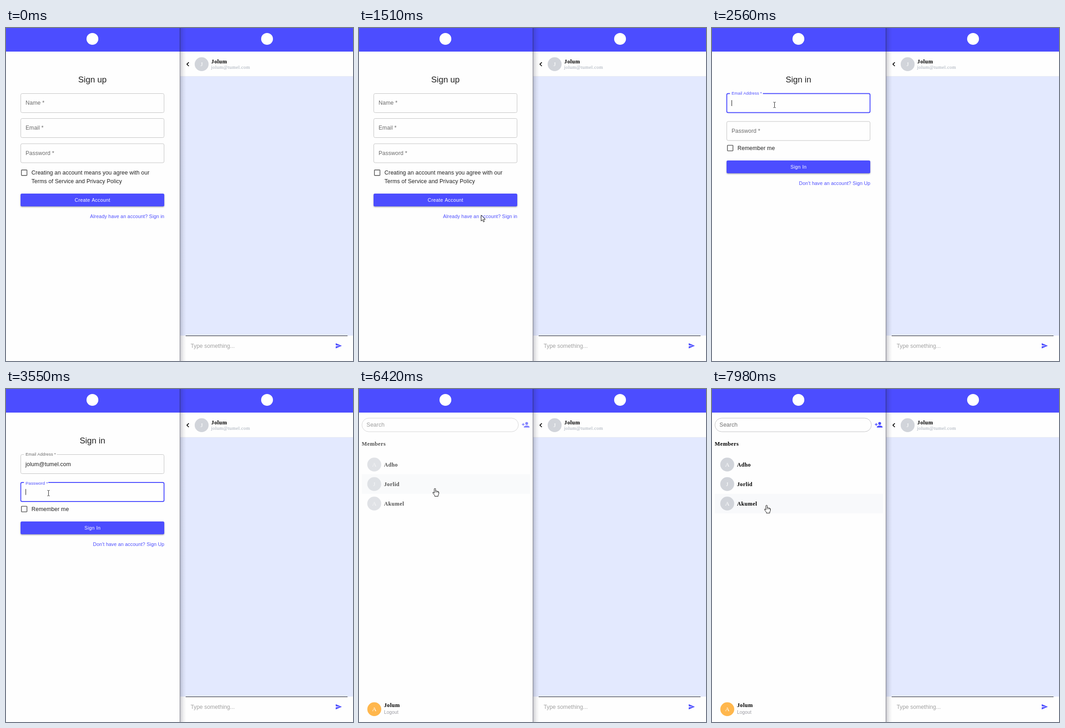
An HTML page with a canvas that plays this animation: 763 px wide and 734 px high, repeating every 8000 ms.

```html
<!DOCTYPE html>
<html lang="en">
<head>
<meta charset="utf-8">
<title>Chat sign-in</title>
<style>
html, body { margin: 0; width: 100%; height: 100%; overflow: hidden; background: #fefefe; }
canvas { display: block; width: 763px; height: 734px; }
</style>
</head>
<body>
<canvas id="stage" width="763" height="734"></canvas>
<script>
const ctx = document.getElementById('stage').getContext('2d');
const LOOP = 8000;
const SANS = '"Liberation Sans", Arial, sans-serif';
const SERIF = '"Liberation Serif", "Times New Roman", serif';
const BLUE = '#4c4dff', WHITE = '#fefefe', INK = '#212121', MUTED = '#6a6a6a', GREY = '#d1d4da';
const BODY = 12.27, SMALL = 10.72;
const USER = 'Jolum', EMAIL = 'jolum@tumel.com';
const MEMBERS = ['Adho', 'Jorlid', 'Akumel'];

const SIGN_IN_AT = 1560, FILLED_AT = 2910, PASSWORD_AT = 3440, RESET_AT = 5760, HOME_AT = 6100;
const KEYS = [4090, 4200, 4310, 4540, 4620, 4700];

// Pointer path: time, x, y
const PATH = [
  [120, 716, 700], [190, 660, 645], [260, 604, 598], [330, 562, 549], [400, 481, 526],
  [470, 428, 507], [720, 262, 468], [900, 240, 468], [950, 240, 468], [1250, 268, 412],
  [1600, 268, 412], [2180, 137, 169], [2950, 137, 169], [3430, 93, 229], [3550, 93, 229],
  [3670, 97, 231], [5180, 97, 231], [5270, 167, 219], [6920, 167, 219], [6990, 161, 219],
  [7190, 161, 219], [7680, 116, 266], [7850, 116, 266], [7980, 120, 256]
];

const clamp = v => Math.max(0, Math.min(1, v));
const mix = (a, b, k) => a + (b - a) * k;

// cubic-bezier(0, 0, .2, 1)
function settle(x) {
  let lo = 0, hi = 1;
  for (let i = 0; i < 16; i++) {
    const s = (lo + hi) / 2;
    if (.6 * s * s + .4 * s ** 3 < x) lo = s; else hi = s;
  }
  return lo * lo * (3 - 2 * lo);
}
const ramp = (t, start) => settle(clamp((t - start) / 200));

function text(str, x, y, { size = BODY, color = INK, family = SANS, weight = 'normal', align = 'left', spacing = 0 } = {}) {
  ctx.font = `${weight} ${size}px ${family}`;
  ctx.letterSpacing = spacing + 'px';
  ctx.textAlign = align;
  ctx.fillStyle = color;
  ctx.fillText(str, x, y);
  return ctx.measureText(str).width;
}
const name = (str, x, y) => text(str, x, y, { family: SERIF, weight: 'bold', color: '#000', spacing: .45 });

function rect(x, y, w, h, color) {
  ctx.fillStyle = color;
  ctx.fillRect(x, y, w, h);
}

function rounded(x, y, w, h, r) {
  ctx.beginPath();
  ctx.roundRect(x, y, w, h, r);
}

function outline(color, width) {
  ctx.strokeStyle = color;
  ctx.lineWidth = width;
  ctx.stroke();
}

function disc(x, y, r, color) {
  ctx.fillStyle = color;
  ctx.beginPath();
  ctx.arc(x, y, r, 0, 7);
  ctx.fill();
}

function polygon(x, y, pts) {
  ctx.beginPath();
  for (let i = 0; i < pts.length; i += 2) ctx.lineTo(x + pts[i], y + pts[i + 1]);
  ctx.closePath();
}

function avatar(letter, x, y, color = GREY) {
  disc(x, y, 15.3, color);
  text(letter, x, y + 4.4, { size: 13.5, family: SERIF, color: '#fff', align: 'center' });
}

function field(y, label, { value = '', focus = false, lift = 0, caret = false } = {}) {
  const size = mix(BODY, BODY * .75, lift);
  const edge = focus ? 2 : 1;
  rounded(32.5, y + .5, 315, 42, 3);
  outline(focus ? BLUE : '#c2c2c2', edge);
  if (lift > 0) {
    ctx.font = `${BODY * .75}px ${SANS}`;
    ctx.letterSpacing = '0px';
    rect(39.5, y - 1, (ctx.measureText(label).width + 7) * clamp(lift * 2), 3, WHITE);
  }
  text(label, 43, y + mix(25.3, 3.2, lift), { size, color: focus ? BLUE : MUTED, spacing: size * .0094 });
  const width = value ? text(value, 42.7, y + 26, { spacing: .115 }) : 0;
  if (caret) rect(43 + Math.round(width), y + 15, 1, 13, '#111');
}

function checkbox(y, lines) {
  rounded(33.9, y - 6.1, 12.2, 12.2, 1);
  outline('#5f5f5f', 1.6);
  lines.forEach((line, i) => text(line, 56, y + 4.2 + i * 18.3, { spacing: .115 }));
}

function button(y, label) {
  ctx.save();
  ctx.shadowColor = 'rgba(0,0,0,.32)';
  ctx.shadowBlur = 3;
  ctx.shadowOffsetY = 1.5;
  rounded(32, y, 316, 28.3, 3);
  ctx.fillStyle = BLUE;
  ctx.fill();
  ctx.restore();
  text(label, 190.2, y + 18, { size: SMALL, color: '#fff', align: 'center', spacing: .306 });
}

const title = str => text(str, 190, 119.7, { size: 18.4, align: 'center' });
const link = (str, y) => text(str, 348.2, y, { size: SMALL, color: BLUE, align: 'right', spacing: .115 });

function signUp() {
  title('Sign up');
  field(144, 'Name *');
  field(199, 'Email *');
  field(254.5, 'Password *');
  checkbox(319, ['Creating an account means you agree with our', 'Terms of Service and Privacy Policy']);
  button(365, 'Create Account');
  link('Already have an account? Sign in', 419);
}

function signIn(t) {
  const reset = t >= RESET_AT;
  const fall = 1 - ramp(t, RESET_AT);
  const onPassword = t >= PASSWORD_AT && !reset;
  const onEmail = t < PASSWORD_AT;
  const typed = KEYS.filter(k => t >= k).length;
  const emailCaret = onEmail && (t >= FILLED_AT || (t - SIGN_IN_AT) % 1000 < 500);
  const passwordCaret = onPassword && (t < 3980 || (t >= KEYS[0] && t < 5200) || t >= 5700);
  title('Sign in');
  field(144, 'Email Address *', {
    value: t >= FILLED_AT && !reset ? EMAIL : '', focus: onEmail, lift: fall, caret: emailCaret
  });
  field(205.5, 'Password *', {
    value: reset ? '' : '•'.repeat(typed), focus: onPassword,
    lift: ramp(t, PASSWORD_AT) * fall, caret: passwordCaret
  });
  checkbox(264.6, ['Remember me']);
  button(292, 'Sign In');
  link("Don't have an account? Sign Up", 346);
}

function addPersonIcon() {
  disc(368.7, 75.9, 3.1, BLUE);
  rect(358, 77.4, 6.1, 1.5, BLUE);
  rect(360.3, 75.1, 1.5, 6.1, BLUE);
  ctx.beginPath();
  ctx.moveTo(362.6, 85);
  ctx.lineTo(362.6, 83.5);
  ctx.bezierCurveTo(362.6, 81.5, 366.7, 80.4, 368.7, 80.4);
  ctx.bezierCurveTo(370.8, 80.4, 374.9, 81.5, 374.9, 83.5);
  ctx.lineTo(374.9, 85);
  ctx.fill();
}

function home(t, pointer) {
  ctx.globalAlpha = 1 - (1 - clamp((t - 6340) / 220)) ** 2.5;
  rounded(6.5, 64.2, 344, 30, 15);
  outline('#c2c2c4', 1);
  text('Search', 16.6, 83, { color: '#6e6e6e', spacing: .1 });
  addPersonIcon();
  name('Members', 6, 125);
  MEMBERS.forEach((member, i) => {
    const top = 145 + i * 43;
    if (pointer.y >= top && pointer.y < top + 43) rect(6, top, 370, 43, '#f8f9fb');
    avatar(member[0], 33.5, top + 21.5);
    name(member, 55, top + 25.7);
  });
  ctx.globalAlpha = 1;
  avatar('A', 33.6, 705.8, '#ffb74d');
  name(USER, 55, 701.3);
  text('Logout', 55, 716, { size: 10.3, color: '#9b9ba2' });
}

function chat() {
  rect(383, 52, 380, 682, WHITE);
  rect(383, 107, 380, 571, '#e3e9fe');
  rect(383, 106, 380, 1, '#e8eaf2');
  ctx.beginPath();
  ctx.moveTo(402, 75.6);
  ctx.lineTo(397.8, 79.8);
  ctx.lineTo(402, 84);
  outline('#000', 1.7);
  avatar(USER[0], 430.2, 79.7);
  name(USER, 451.3, 78);
  text(EMAIL, 451, 90, { size: SMALL, family: SERIF, color: '#a3abb6', spacing: .35 });
  rect(395, 678, 356, 1, '#1c1c1c');
  text('Type something...', 406, 705, { color: '#a2a2a2' });
  polygon(725, 694.8, [0, 0, 13.5, 5.7, 0, 11.5, 0, 7, 9.6, 5.7, 0, 4.5]);
  ctx.fillStyle = BLUE;
  ctx.fill();
}

function frame() {
  rect(0, 0, 763, 52, BLUE);
  disc(190, 24, 13, '#fff');
  disc(574, 24, 13, '#fff');
  const shade = ctx.createLinearGradient(383, 0, 396, 0);
  shade.addColorStop(0, 'rgba(30,30,50,.22)');
  shade.addColorStop(.5, 'rgba(30,30,50,.07)');
  shade.addColorStop(1, 'rgba(30,30,50,0)');
  rect(383, 0, 13, 734, shade);
  rect(382, 0, 1, 734, 'rgba(30,30,50,.62)');
}

function pointerAt(t) {
  if (t < PATH[0][0]) return { x: -50, y: -50 };
  const i = PATH.findIndex(p => p[0] > t);
  if (i < 0) return { x: 120, y: 256 };
  const [t0, x0, y0] = PATH[i - 1], [t1, x1, y1] = PATH[i];
  const k = (t - t0) / (t1 - t0);
  return { x: Math.round(mix(x0, x1, k)), y: Math.round(mix(y0, y1, k)) };
}

function cursorShape(t, { y }) {
  if (t >= HOME_AT) return hand;
  if (t < SIGN_IN_AT) return arrow;
  if ((y > 144 && y < 187) || (y > 205 && y < 248)) return beam;
  return y > 292 && y < 320 ? hand : arrow;
}

function paintCursor() {
  ctx.fillStyle = '#fff';
  ctx.fill();
  outline('#111', 1);
}

function arrow(x, y) {
  polygon(x + .5, y + .5, [0, 0, 0, 13, 3, 10.2, 5.1, 15, 7.3, 14, 5.2, 9.4, 9.4, 9.2]);
  paintCursor();
}

function beam(x, y) {
  rect(x, y - 5, 1, 11, '#222');
  for (const dy of [-6, 6]) {
    rect(x - 2, y + dy, 2, 1, '#222');
    rect(x + 1, y + dy, 2, 1, '#222');
  }
}

function hand(x, y) {
  ctx.lineJoin = 'round';
  polygon(x, y, [-1.5, 1, 0, 0, 1.5, 1, 1.5, 6, 3.2, 5.4, 4.3, 6.6, 6, 6.2, 7, 7.5, 8.5, 8,
    8.5, 12, 7, 15, 7, 17.5, -.5, 17.5, -.5, 15.5, -4.5, 10.5, -4.5, 8.8, -3, 8.8, -1.5, 10.5]);
  paintCursor();
  for (const dx of [1.5, 4.3, 7]) rect(x + dx - .4, y + 6, .8, 3.5, '#111');
  ctx.lineJoin = 'miter';
}

function draw(now) {
  const t = now % LOOP;
  const pointer = pointerAt(t);
  rect(0, 0, 763, 734, WHITE);
  if (t < SIGN_IN_AT) signUp();
  else if (t < HOME_AT) signIn(t);
  else home(t, pointer);
  chat();
  frame();
  cursorShape(t, pointer)(pointer.x, pointer.y);
}

const start = performance.now();
function tick() {
  draw(performance.now() - start);
  requestAnimationFrame(tick);
}
tick();
</script>
</body>
</html>
```
